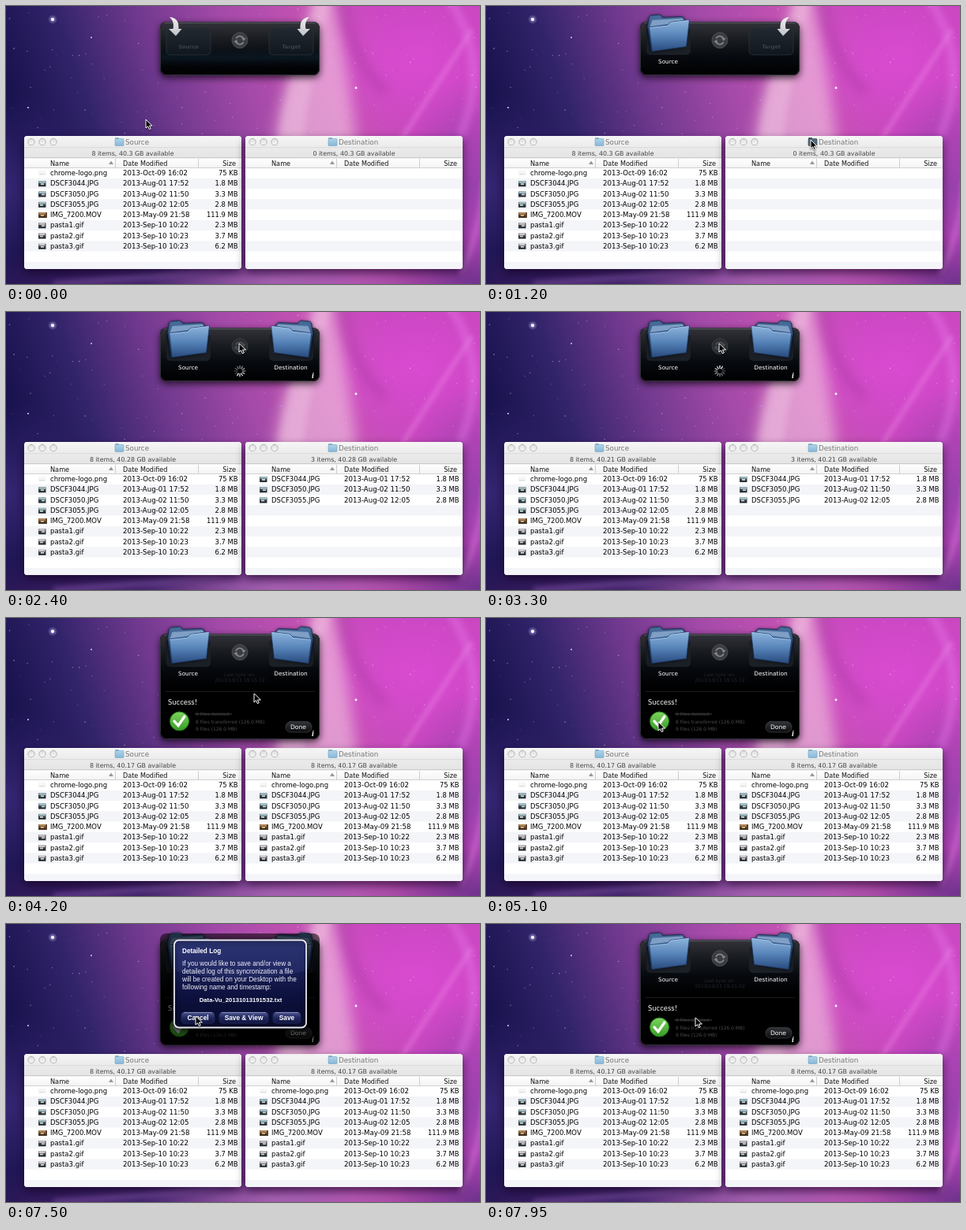
Animation, 600 px wide and 353 px high, one loop 8000 ms. Source, as an HTML page with a canvas:

```html
<!DOCTYPE html>
<html lang="en">
<head>
<meta charset="utf-8">
<title>Folder sync</title>
<style>
html, body { margin: 0; width: 100%; height: 100%; overflow: hidden; background: #5a2a78; }
canvas { display: block; width: 600px; height: 353px; }
</style>
</head>
<body>
<canvas id="stage" width="600" height="353"></canvas>
<script>
const W = 600, H = 353, LOOP = 8000, STEP = 150;
const UI = '"DejaVu Sans", sans-serif', DIALOG = '"Liberation Sans", Arial, sans-serif';
const canvas = document.getElementById('stage');
let c = canvas.getContext('2d');

const FILES = [
  ['chrome-logo.png', '2013-Oct-09 16:02', '75 KB'],
  ['DSCF3044.JPG', '2013-Aug-01 17:52', '1.8 MB'],
  ['DSCF3050.JPG', '2013-Aug-02 11:50', '3.3 MB'],
  ['DSCF3055.JPG', '2013-Aug-02 12:05', '2.8 MB'],
  ['IMG_7200.MOV', '2013-May-09 21:58', '111.9 MB'],
  ['pasta1.gif', '2013-Sep-10 10:22', '2.3 MB'],
  ['pasta2.gif', '2013-Sep-10 10:23', '3.7 MB'],
  ['pasta3.gif', '2013-Sep-10 10:23', '6.2 MB']
];

// Pointer path: time, x, y
const POINTER = [
  [0, 177, 144], [300, 143, 170], [450, 143, 170], [900, 228, 45], [1200, 411, 170],
  [1350, 411, 170], [1800, 361, 45], [2100, 295, 40], [3600, 295, 40], [4200, 314, 96],
  [4350, 314, 96], [4950, 218, 132], [5550, 218, 132], [6000, 240, 117],
  [7500, 240, 117], [7950, 265, 119]
];

const clamp = v => Math.max(0, Math.min(1, v));
const ramp = (t, from, to) => { const p = clamp((t - from) / (to - from)); return p * p * (3 - 2 * p); };

function pointerAt(t) {
  const i = POINTER.findIndex(k => k[0] > t);
  if (i < 0) return POINTER[POINTER.length - 1].slice(1);
  const a = POINTER[i - 1], b = POINTER[i], p = ramp(t, a[0], b[0]);
  return [a[1] + (b[1] - a[1]) * p, a[2] + (b[2] - a[2]) * p];
}

function text(s, x, y, size, color, align = 'left', weight = '', family = UI) {
  c.font = `${weight} ${size}px ${family}`;
  c.textAlign = align;
  c.fillStyle = color;
  c.fillText(s, x, y);
}

function vertical(y0, y1, ...colors) {
  const g = c.createLinearGradient(0, y0, 0, y1);
  colors.forEach((color, i) => g.addColorStop(i / (colors.length - 1), color));
  return g;
}

function box(x, y, w, h, r, fill, stroke, line = 1) {
  c.beginPath();
  c.roundRect(x, y, w, h, r);
  if (fill) { c.fillStyle = fill; c.fill(); }
  if (stroke) { c.strokeStyle = stroke; c.lineWidth = line; c.stroke(); }
}

function rect(x, y, w, h, fill) { c.fillStyle = fill; c.fillRect(x, y, w, h); }

function disc(x, y, r, fill, stroke, line = 1) { box(x - r, y - r, 2 * r, 2 * r, r, fill, stroke, line); }

function poly(points, fill, stroke, line = 1) {
  c.beginPath();
  points.forEach(([x, y]) => c.lineTo(x, y));
  c.closePath();
  if (fill) { c.fillStyle = fill; c.fill(); }
  if (stroke) { c.strokeStyle = stroke; c.lineWidth = line; c.stroke(); }
}

function at(x, y, draw, sx = 1) {
  c.save();
  c.translate(x, y);
  c.scale(sx, 1);
  draw();
  c.restore();
}

function shadow(color, blur, dy, draw) {
  c.save();
  c.shadowColor = color;
  c.shadowBlur = blur;
  c.shadowOffsetY = dy;
  draw();
  c.restore();
}

function glow(x, y, rx, ry, turn, rgb, alpha) {
  c.save();
  c.translate(x, y);
  c.rotate(turn);
  c.scale(rx, ry);
  const g = c.createRadialGradient(0, 0, 0, 0, 0, 1);
  g.addColorStop(0, `rgba(${rgb},${alpha})`);
  g.addColorStop(.5, `rgba(${rgb},${alpha * .5})`);
  g.addColorStop(1, `rgba(${rgb},0)`);
  rect(-1, -1, 2, 2, g);
  c.restore();
}

function softShape(path, blur, color, line) {
  c.save();
  c.filter = `blur(${blur}px)`;
  c.fillStyle = c.strokeStyle = color;
  c.lineWidth = line;
  const shape = new Path2D(path);
  if (line) c.stroke(shape); else c.fill(shape);
  c.restore();
}

function paintSky() {
  const g = c.createLinearGradient(0, 130, 470, -30);
  ['#15104a', '#32246a', '#71398f', '#a44aa9', '#c452b3', '#c646bd']
    .forEach((color, i) => g.addColorStop(i / 5, color));
  rect(0, 0, W, H, g);
  glow(0, 230, 110, 120, 0, '74,52,140', .6);
  glow(520, 70, 150, 110, 0, '222,76,214', .8);
  glow(590, 230, 90, 140, 0, '140,64,168', .8);
  glow(600, 350, 160, 60, 0, '92,46,130', .8);
  glow(120, 365, 230, 60, 0, '72,34,104', .9);
  glow(340, 350, 170, 26, 0, '170,104,180', .8);
  // Pale curtain of light with a sharper left edge
  softShape('M390 -20 C382 45 348 80 338 190 H445 C440 120 428 60 414 -20 Z', 9, 'rgba(244,196,226,.62)');
  softShape('M392 -20 C384 45 352 80 343 190 H375 C380 110 398 60 412 -20 Z', 4, 'rgba(246,206,228,.35)');
  softShape('M425 -10 Q432 60 480 110', 6, 'rgba(158,52,156,.3)', 14);
  softShape('M500 170 L590 30', 3, 'rgba(255,170,245,.35)', 5);
  softShape('M560 -10 Q615 70 575 165', 5, 'rgba(236,130,240,.45)', 9);
  softShape('M575 340 Q600 290 605 220', 3, 'rgba(220,140,225,.4)', 6);
  softShape('M60 353 Q180 345 270 334', 3, 'rgba(150,100,190,.4)', 8);
  // Stars
  let seed = 11;
  const random = () => (seed = seed * 16807 % 2147483647) / 2147483647;
  for (let i = 0; i < 190; i++) {
    const x = random() * W, y = random() * 165;
    disc(x, y, .3 + random() * .5, `rgba(235,215,255,${.2 + random() * .5})`);
  }
  glow(59, 17, 6, 6, 0, '200,200,255', .7);
  disc(59, 17, 2, '#fff');
  disc(28, 129, 1, '#ddd2ff');
  disc(108, 40, .9, '#ddd2ff');
  disc(443, 104, 1.4, '#fff');
}

function smallFolder(x, y, pressed) {
  box(x, y, 5, 4, 1, pressed ? '#46586a' : '#82b2d2');
  box(x, y + 1.5, 11, 9, 1, pressed ? '#526a7e' : vertical(y, y + 11, '#b7d9ec', '#83b5d6'), pressed ? '#344552' : '#76a3c0', .6);
}

function thumbnail(i, y) {
  if (i === 0) {
    rect(41, y - 3, 10, 6, '#f6f6f6');
    rect(42, y + 1, 7, 1, '#d5d9d5');
    return;
  }
  const movie = i === 4, gif = i > 4;
  rect(41, y - 3, movie ? 11 : 9.5, 7, movie ? '#5a4430' : '#3a444a');
  rect(41.5, y - 3, gif ? 8 : 8.5, 2.5, movie ? '#b4875b' : gif ? '#cfc6ca' : '#9dbcc4');
  rect(43 + i % 3, y, 4, 2, movie ? '#d6b06f' : gif ? '#ddd3cf' : '#d0ddd6');
  rect(42, y + 2, 8, 1, '#14191c');
}

function fileWindow(x, title, count, space, pressed) {
  const source = title === 'Source';
  at(x, 0, () => {
    shadow('rgba(20,0,30,.65)', 12, 5, () => box(23, 165, 275, 169, 4, '#fff'));
    c.save();
    c.beginPath();
    c.roundRect(23, 165, 275, 169, 4);
    c.clip();
    rect(23, 165, 275, 28, vertical(165, 193, '#f6f6f6', '#ebebeb', '#e5e5e5'));
    rect(23, 179.5, 275, .6, '#cfcfcf');
    rect(23, 193, 275, 12.4, vertical(193, 205, '#fff', '#f4f4f4'));
    rect(23, 192.5, 275, .7, '#b4b4b4');
    rect(23, 205, 275, .7, '#c2c2c2');
    for (let i = 1; i < 10; i += 2) rect(23, 205.6 + i * 13.25, 275, 13.25, '#f4f5f8');
    c.restore();
    [32, 46, 60].forEach(px => disc(px, 172.5, 4.2, vertical(168, 177, '#dcdcdc', '#fafafa'), '#a8a8a8', .8));
    smallFolder(source ? 138 : 128, 167, pressed);
    text(title, source ? 151 : 141, 176, 8.75, '#757575');
    text(`${count} items, ${space} GB available`, 160.5, 190, 7.9, '#444', 'center');
    text('Name', 56, 202.5, 8.2, '#111');
    text('Date Modified', 148, 202.5, 8.1, '#111');
    text('Size', 291, 202.5, 8.2, '#111', 'right');
    poly([[130, 201], [133, 196.5], [136, 201]], '#999');
    rect(138, 194, .8, 11, '#c4c4c4');
    rect(243, 194, .8, 11, '#c4c4c4');
    FILES.filter((file, i) => count === 8 || count === 3 && i > 0 && i < 4).forEach((file, row) => {
      const y = 212.1 + row * 13.25;
      thumbnail(FILES.indexOf(file), y);
      text(file[0], 56, y + 3, 8.5, '#000');
      text(file[1], 148, y + 3, 8.65, '#000');
      text(file[2], 293.5, y + 3, 8.4, '#000', 'right');
    });
  });
}

function bigFolder(x, flip) {
  at(x, 0, () => {
    shadow('rgba(0,0,0,.7)', 4, 1, () =>
      poly([[1, 26], [3, 14], [5, 12], [17, 11], [20, 14.5], [45, 13.5], [48, 17], [48, 50], [6, 57]],
        vertical(11, 57, '#4f76a8', '#1f3c66'), '#14284a', .8));
    poly([[4, 26], [7, 18], [45, 15.5], [48, 20]], '#7f9fc6');
    poly([[3, 27], [26, 24.5], [30, 20.5], [54, 17.5], [50, 51.5], [7, 57.5]],
      vertical(18, 58, '#8db3dc', '#5683b8', '#27497d'), '#1e3b68', .8);
    c.beginPath();
    c.moveTo(4, 27.5); c.lineTo(26.5, 25.2); c.lineTo(30.5, 21.2); c.lineTo(53, 18.4);
    c.strokeStyle = '#a9cbee';
    c.stroke();
  }, flip);
}

function well(x, label, arrowX, flip) {
  box(x, 27, 56, 35, 5, vertical(27, 62, '#242a31', '#10161d'), '#2d333b', .8);
  text(label, x + 28, 54, 6.6, '#3b424b', 'center', 'bold');
  at(arrowX, 0, () => {
    c.beginPath();
    c.moveTo(-6, 14);
    c.bezierCurveTo(3, 15, 6, 20, 5.5, 29);
    c.lineTo(9.5, 29); c.lineTo(2, 38); c.lineTo(-7, 29); c.lineTo(-1.5, 29);
    c.bezierCurveTo(0, 22, -2, 18, -6, 14);
    c.fillStyle = vertical(14, 38, '#f0f0f2', '#c2c2c7');
    c.fill();
  }, flip);
}

function syncButton(busy) {
  disc(296, 43.5, 10, busy ? '#2b2e33' : '#3b3d43', busy ? '#383c42' : '#4a4c52');
  c.strokeStyle = busy ? '#4c5056' : '#85878d';
  c.lineWidth = 1.7;
  for (const turn of [0, Math.PI]) {
    c.save();
    c.translate(296, 43.5);
    c.rotate(turn);
    c.beginPath();
    c.arc(0, 0, 5.2, .5, 2.8);
    c.stroke();
    poly([[-7.6, 2.6], [-4.5, -1], [-2.3, 3.2]], c.strokeStyle);
    c.restore();
  }
}

function spinner(t) {
  c.lineWidth = 1.2;
  c.lineCap = 'round';
  for (let i = 0; i < 12; i++) {
    const a = i * Math.PI / 6, age = (Math.floor(t / STEP) - i + 120) % 12;
    c.strokeStyle = `rgba(255,255,255,${1 - age * .065})`;
    c.beginPath();
    c.moveTo(296 + 3.6 * Math.cos(a), 75 + 3.6 * Math.sin(a));
    c.lineTo(296 + 6.7 * Math.cos(a), 75 + 6.7 * Math.sin(a));
    c.stroke();
  }
}

function results() {
  text('Last sync on:', 296, 74, 6, '#25272b', 'center');
  text('2013/10/13 19:15:32', 296, 81, 6, '#25272b', 'center');
  for (let x = 202; x < 391; x += 2) rect(x, 93, 1, 1, '#303238');
  text('Success!', 205, 110, 8.4, '#fff');
  disc(219.5, 131, 12, vertical(119, 143, '#7ed45f', '#369c26'), '#257a1c');
  c.beginPath();
  c.moveTo(213, 131); c.lineTo(218, 136.5); c.lineTo(226, 125);
  c.strokeStyle = '#fff';
  c.lineWidth = 3.3;
  c.lineCap = 'round';
  c.stroke();
  text('0 files deleted', 240, 124, 5.95, '#393a3e');
  rect(239, 121.5, 47, .9, '#4a4b50');
  text('8 files transferred (126.0 MB)', 240, 133.5, 5.95, '#494a4e');
  text('9 files (126.0 MB)', 240, 142.5, 5.95, '#494a4e');
  box(354, 131.5, 33, 13.5, 6.5, vertical(131, 145, '#34363b', '#0c0d0f'), '#3d3f44', .8);
  text('Done', 370, 141, 7.6, '#fff', 'center');
}

function panel(t) {
  const busy = t >= 2100 && t < 3900, h = 68 + 66 * ramp(t, 3750, 4050);
  shadow('rgba(0,0,0,.75)', 10, 3, () => box(195, 20, 202, h, 8, '#050608'));
  box(195.5, 20.5, 201, h - 1, 8, vertical(20, 88, '#34343b', '#181b20', '#06090e', '#000'), '#32323a');
  box(200, 21, 192, 1, 0, 'rgba(255,255,255,.18)');
  if (t < 900) {
    rect(196, 54, 200, 22, vertical(54, 76, 'rgba(12,30,44,0)', 'rgba(12,30,44,.6)', 'rgba(12,30,44,0)'));
  }
  if (t < 900) well(203, 'Source', 213, 1);
  else {
    box(203, 27, 56, 35, 5, '#1b2027');
    bigFolder(203.5, 1);
    text('Source', 230.5, 73, 7.25, '#fff', 'center');
  }
  if (t < 1800) well(333, 'Target', 378, -1);
  else {
    box(333, 27, 56, 35, 5, '#1b2027');
    bigFolder(389.5, -1);
    text('Destination', 360.5, 73, 7.4, '#fff', 'center');
  }
  syncButton(busy);
  if (busy) spinner(t);
  if (t >= 3750) {
    c.save();
    c.beginPath();
    c.rect(195, 20, 202, h - 2);
    c.clip();
    c.globalAlpha = ramp(t, 3750, 4050);
    results();
    c.restore();
  }
  if (t >= 2100) text('i', 388.5, 15.5 + h, 10, '#fff', 'center', 'italic bold', '"Liberation Serif", serif');
}

function dialogButton(x, w, label) {
  box(x, 112, w, 14, 4, vertical(112, 126, '#4c548f', '#20285f', '#10143f'), '#252c61', .8);
  rect(x + 3, 112, w - 6, .8, '#9ba2ce');
  text(label, x + w / 2, 122, 8.3, '#fff', 'center', 'bold', DIALOG);
}

function dialog(t) {
  const shown = t < 7000 ? ramp(t, 5100, 5400) : 1 - ramp(t, 7500, 7800);
  if (!shown) return;
  c.save();
  c.globalAlpha = shown;
  box(195, 12, 202, 142, 8, 'rgba(0,0,0,.55)');
  shadow('rgba(0,0,0,.8)', 6, 2, () =>
    box(213, 20.5, 167, 111, 6, vertical(20, 132, '#242b68', '#181e55', '#0c103c', '#080b2b'), '#e8e9f2', 1.8));
  c.beginPath();
  c.moveTo(215, 23); c.lineTo(378, 23); c.lineTo(378, 60);
  c.quadraticCurveTo(296, 78, 215, 60);
  c.fillStyle = 'rgba(110,125,200,.12)';
  c.fill();
  text('Detailed Log', 223, 36.5, 8.2, '#fff', 'left', 'bold', DIALOG);
  ['If you would like to save and/or view a', 'detailed log of this syncronization a file',
    'will be created on your Desktop with the', 'following name and timestamp:']
    .forEach((line, i) => text(line, 223, 52.5 + i * 10.2, 8.2, '#f0f1fa', 'left', '', DIALOG));
  text('Data-Vu_20131013191532.txt', 297, 99, 7.7, '#fff', 'center', 'bold', DIALOG);
  dialogButton(222, 42, 'Cancel');
  dialogButton(270, 62, 'Save & View');
  dialogButton(338, 35, 'Save');
  c.restore();
}

function pointer(t) {
  const [x, y] = pointerAt(t);
  if (t > 450 && t < 900 || t > 1350 && t < 1800) {
    c.globalAlpha = .65;
    smallFolder(x - 4, y - 4);
    c.globalAlpha = 1;
  }
  at(x, y, () => shadow('rgba(0,0,0,.5)', 2, 1, () =>
    poly([[0, 0], [0, 11], [2.6, 8.7], [4.3, 12.6], [6.2, 11.8], [4.5, 8], [8, 8]], '#000', '#fff', 1)));
}

const sky = document.createElement('canvas');
sky.width = W;
sky.height = H;
const screen = c;
c = sky.getContext('2d');
paintSky();
c = screen;

function frame(now) {
  const t = Math.floor(now % LOOP / STEP) * STEP;
  const space = t < 2100 ? '40.3' : t < 2700 ? '40.28' : t < 3150 ? '40.25' : t < 3750 ? '40.21' : '40.17';
  const copied = t < 2250 ? 0 : t < 3750 ? 3 : 8;
  c.drawImage(sky, 0, 0);
  fileWindow(0, 'Source', 8, space, t >= 300 && t < 900);
  fileWindow(280, 'Destination', copied, space, t >= 1200 && t < 1800);
  panel(t);
  dialog(t);
  pointer(t);
  requestAnimationFrame(frame);
}
requestAnimationFrame(frame);
</script>
</body>
</html>
```
